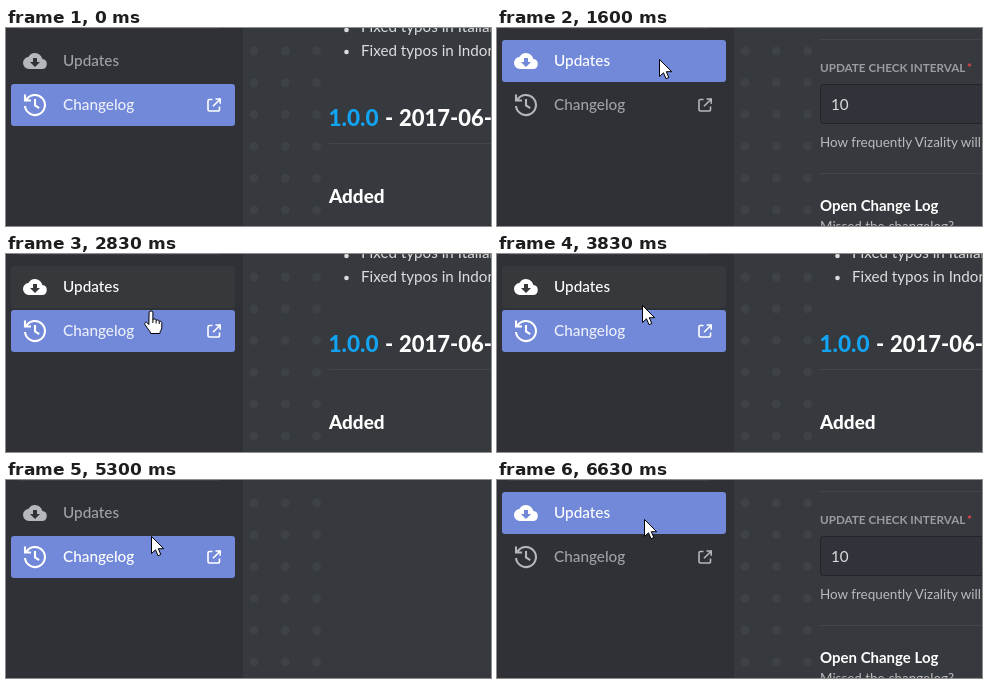
These frames come from a looping animation (485x198 px, 7.26 s). An HTML page:

```html
<!DOCTYPE html>
<html lang="en">
<head>
<meta charset="utf-8">
<title>Settings sidebar</title>
<style>
html, body { margin: 0; width: 100%; height: 100%; overflow: hidden; background: #363a3e; }
svg { display: block; width: 485px; height: 198px; font-family: Lato, "Open Sans", sans-serif; }
.nav { font-size: 15.3px; font-weight: 500; }
.body { font-size: 15.2px; fill: #dcddde; }
.note { font-size: 13.45px; fill: #b9bbbe; }
.bold { font-weight: 700; fill: #fff; }
.head { font-weight: 800; fill: #fff; }
.label { font-size: 11.7px; font-weight: 700; fill: #9a9ca1; }
.rule { stroke: #42454a; }
.line { fill: none; }
</style>
</head>
<body>
<svg viewBox="0 0 485 198">
  <rect width="485" height="198" fill="#363a3e"/>
  <g id="dots" fill="#3e4246"></g>

  <g id="log">
    <g class="body">
      <circle cx="340.5" cy="2" r="2.3"/>
      <circle cx="340.5" cy="24" r="2.3"/>
      <text x="355" y="4">Fixed typos in Italian</text>
      <text x="355" y="28">Fixed typos in Indonesian</text>
    </g>
    <g class="head">
      <text x="322.5" y="98" font-size="22.6" fill="#12a4f3">1.0.0</text>
      <text x="379" y="98" font-size="22">-</text>
      <text x="393" y="98" font-size="22">2017-06-15</text>
      <text x="323" y="175" font-size="18.9">Added</text>
    </g>
    <path class="rule" d="M323 115.5H485"/>
  </g>

  <g id="updates">
    <path class="rule" d="M323 11.5H485M323 145.5H485"/>
    <text class="label" x="323" y="44">UPDATE CHECK INTERVAL</text>
    <text class="label" x="470" y="44" style="fill:#f04747">*</text>
    <rect x="323.5" y="56.5" width="180" height="39" rx="3" fill="#303339" stroke="#222427"/>
    <text class="body" x="334" y="82">10</text>
    <text class="note" x="323" y="119">How frequently Vizality will check</text>
    <text class="bold" x="323" y="183" font-size="15">Open Change Log</text>
    <text class="note" x="323" y="203">Missed the changelog?</text>
  </g>

  <rect width="237" height="198" fill="#2f3136"/>
  <path d="M12 .5H213" stroke="#3b3d42"/>

  <g id="navU" class="nav">
    <rect x="5" y="12" width="224" height="42" rx="3"/>
    <path class="icon" transform="translate(17 21)" d="M19.35 10.04A7.49 7.49 0 0 0 12 4C9.11 4 6.6 5.64 5.35 8.04A6 6 0 0 0 0 14a6 6 0 0 0 6 6h13a5 5 0 0 0 .35-9.96zM17 13l-5 5-5-5h3V9h4v4z"/>
    <text x="57" y="38">Updates</text>
  </g>
  <g id="navC" class="nav">
    <rect x="5" y="56" width="224" height="42" rx="3"/>
    <path class="line" stroke-width="2.1" d="M19 66.5v6h6M20.3 72A10 10 0 1 1 19 78M29 71v6.5l4.2 2.7"/>
    <text x="57" y="82">Changelog</text>
    <path class="line" stroke-width="1.6" d="M206.5 71.5h-3a1.5 1.5 0 0 0-1.5 1.5v8.5a1.5 1.5 0 0 0 1.5 1.5h8.5a1.5 1.5 0 0 0 1.5-1.5v-3M209.5 71h4.7v4.7M214 71.2l-7 7"/>
  </g>

  <g id="cursor" fill="#fff" stroke="#000" stroke-linejoin="round">
    <path id="arrow" transform="translate(-.5 -.5)" d="M0 0v17l4-3.7 2.5 5.9 2.8-1.2-2.5-5.8h5.4z"/>
    <g id="hand" transform="translate(-1 4)">
      <path d="M-1.9 1.8a1.9 1.9 0 0 1 3.8 0v6.4c1.6-.7 3 .1 3.2 1 1.6-.6 2.9.1 3.1 1.1 1.7-.4 2.6.4 2.6 2v4.5c0 1.6-1.9 3.2-1.9 5.7h-9.3c0-2.2-3-4.4-5.6-9-.9-1.8 1-3.2 2.5-1.5l1.3 1.5z"/>
      <path fill="none" d="M1.9 8v4M5.1 9.2v3.3M8.2 10.3v2.7"/>
    </g>
  </g>
</svg>
<script>
const LOOP = 7260, ENTER = 330, LOAD = 400, LAG = 30;
const $ = id => document.getElementById(id);

// Clicks alternate between the two pages, starting on the changelog.
const clicks = [1530, 2170, 2930, 3300, 3890, 4270, 4640, 5070, 5460, 5900, 6600];

// Pointer stops: time, x, y
const UP = [148, 40], DOWN = [148, 68];
const stops = [
  [330, 484, 196], [1030, 195, 43], [1200, 163, 32], [1640, 163, 32],
  [2000, ...DOWN], [2730, ...DOWN], [2785, 146, 53], [2830, 146, 53],
  [2920, ...UP], [2970, ...UP], [3130, ...DOWN], [3680, ...DOWN],
  [3790, 147, 60], [3830, 146, 52], [3880, 148, 42], [3910, 148, 42],
  [4000, 148, 64], [4130, ...DOWN], [4470, ...DOWN], [4610, ...UP],
  [4690, ...UP], [4870, ...DOWN], [5170, ...DOWN], [5300, 146, 57],
  [5420, ...UP], [5540, ...UP], [5770, ...DOWN], [6140, ...DOWN],
  [6400, ...UP], [LOOP, ...UP]
];

for (let row = 0; row < 6; row++)
  for (let col = 0; col < 3; col++) {
    const dot = document.createElementNS('http://www.w3.org/2000/svg', 'circle');
    dot.setAttribute('cx', 248 + col * 31.3);
    dot.setAttribute('cy', 23 + row * 31.8);
    dot.setAttribute('r', 4.5);
    $('dots').append(dot);
  }

function pointer(t) {
  const i = stops.findIndex(s => s[0] > t);
  if (i < 1) return stops[0].slice(1);
  const [a, b] = [stops[i - 1], stops[i]];
  const k = (t - a[0]) / (b[0] - a[0]);
  const e = k * k * (3 - 2 * k);
  return [a[1] + (b[1] - a[1]) * e, a[2] + (b[2] - a[2]) * e];
}

function pageAt(t) {
  const n = clicks.filter(c => c <= t).length;
  return { name: n % 2 ? 'U' : 'C', age: n ? t - clicks[n - 1] : Infinity };
}

function hoverAt(t) {
  if (t < ENTER) return '';
  const [x, y] = pointer(t);
  if (x < 5 || x > 229) return '';
  return y >= 12 && y < 54 ? 'U' : y >= 56 && y < 98 ? 'C' : '';
}

const show = (id, on) => $(id).setAttribute('visibility', on ? 'visible' : 'hidden');

function paintItem(key, selected, hovered) {
  const item = $('nav' + key);
  const set = (sel, attr, value) =>
    item.querySelectorAll(sel).forEach(el => el.setAttribute(attr, value));
  const icon = selected || hovered ? '#fff' : '#b5b7ba';
  set('rect', 'fill', selected ? '#7289da' : hovered ? '#36383c' : 'none');
  set('text', 'fill', hovered ? '#fff' : selected ? '#eceffa' : '#a0a2a6');
  set('.icon', 'fill', icon);
  set('.line', 'stroke', icon);
}

function render(t) {
  const tab = pageAt(t).name, view = pageAt(t - LAG);
  const hover = hoverAt(t), felt = hoverAt(t - LAG);
  paintItem('U', tab === 'U', hover === 'U');
  paintItem('C', tab === 'C', hover === 'C');
  show('updates', view.name === 'U');
  show('log', view.name === 'C' && view.age >= LOAD - LAG);

  const link = felt !== '' && felt !== view.name;
  const [x, y] = pointer(t);
  $('cursor').setAttribute('transform', `translate(${x.toFixed(1)} ${y.toFixed(1)})`);
  show('arrow', t >= ENTER && !link);
  show('hand', t >= ENTER && link);
}

const start = performance.now();
function tick() {
  render((performance.now() - start) % LOOP);
  requestAnimationFrame(tick);
}
tick();
</script>
</body>
</html>
```
